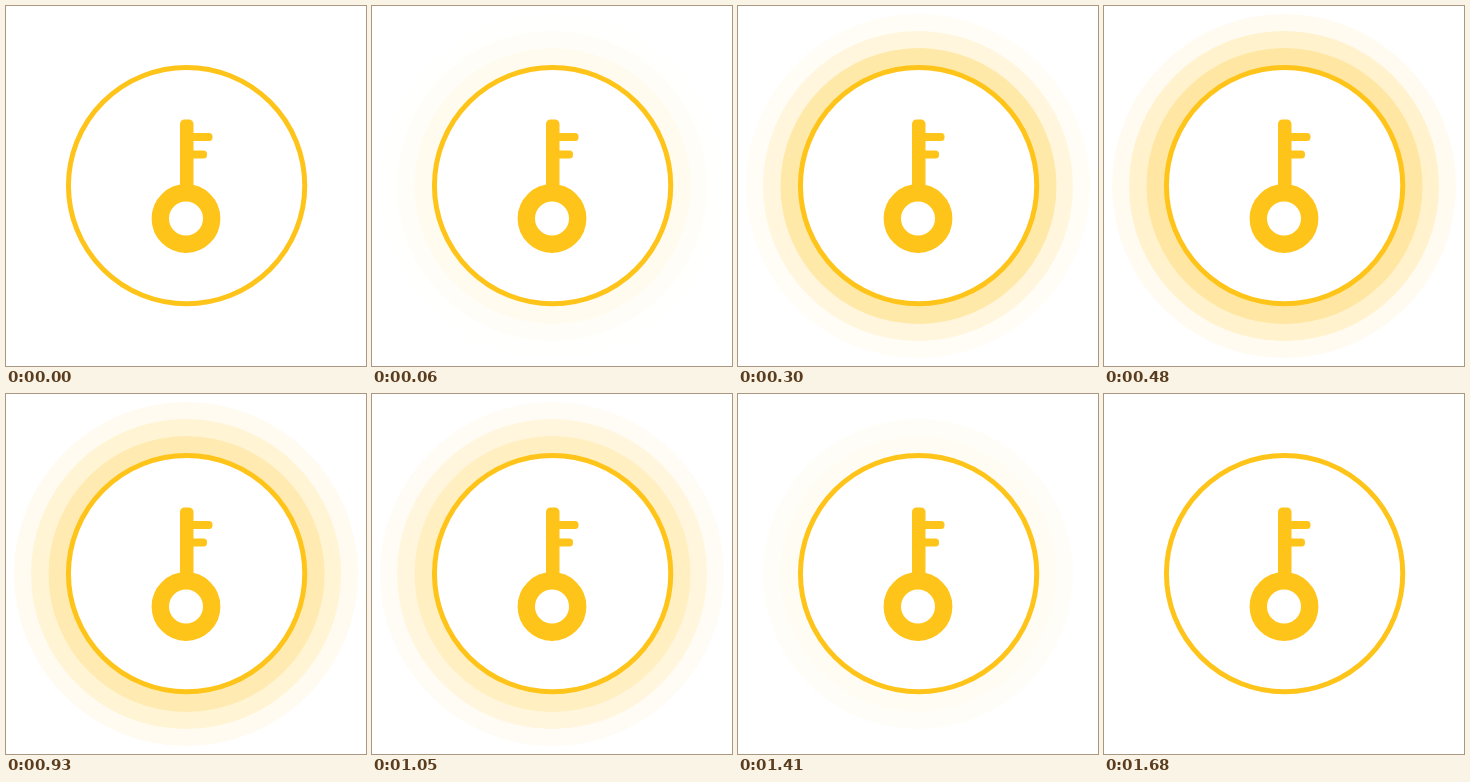
Write an HTML page that moves like this. It is 360x360 px and loops after 1.87 s.

```html
<!DOCTYPE html>
<html lang="en">
<head>
<meta charset="utf-8">
<title>Key pulse</title>
<style>
  html, body { margin: 0; width: 100%; height: 100%; overflow: hidden; background: #fff; }
  svg { display: block; width: 100vw; height: 100vh; }
</style>
</head>
<body>
<svg viewBox="0 0 360 360">
  <g fill="#fff">
    <circle id="outer" cx="180" cy="180" r="172"/>
    <circle id="middle" cx="180" cy="180" r="155"/>
    <circle id="inner" cx="180.5" cy="180" r="138"/>
  </g>
  <circle cx="180.6" cy="179.65" r="118.15" fill="#fff" stroke="#ffc41a" stroke-width="5"/>
  <g fill="#ffc41a">
    <rect x="174" y="113.5" width="13.5" height="72" rx="4.5"/>
    <rect x="180" y="127" width="26.5" height="8" rx="3.5"/>
    <rect x="180" y="144.5" width="21" height="8" rx="3.5"/>
  </g>
  <circle cx="180" cy="212.5" r="25.7" fill="#fff" stroke="#ffc41a" stroke-width="17.4"/>
</svg>
<script>
  const LOOP = 1870;
  // moments at which the glow is redrawn; it holds still in between
  const ticks = [0, 60, 120, 180, 240, 300, 480, 930, 1050, 1200, 1410, 1680];

  const clamp = x => Math.max(0, Math.min(1, x));
  const tint = a =>
    `rgb(255, ${Math.round(255 - 60 * a)}, ${Math.round(255 - 229 * a)})`;

  // linear rise from 0, plateau at peak, linear fall between two times
  function pulse(id, peak, rise, fallFrom, fallTo) {
    const level = t =>
      peak * clamp(t / rise) * clamp((fallTo - t) / (fallTo - fallFrom));
    const frames = ticks.map(t => ({
      offset: t / LOOP,
      fill: tint(level(t)),
      easing: 'steps(1, end)'
    }));
    frames.push({ offset: 1, fill: tint(0) });
    document.getElementById(id).animate(frames, { duration: LOOP, iterations: Infinity });
  }

  pulse('inner', 0.4, 320, 830, 1500);
  pulse('middle', 0.22, 440, 830, 1500);
  pulse('outer', 0.06, 440, 1000, 1200);
</script>
</body>
</html>
```
